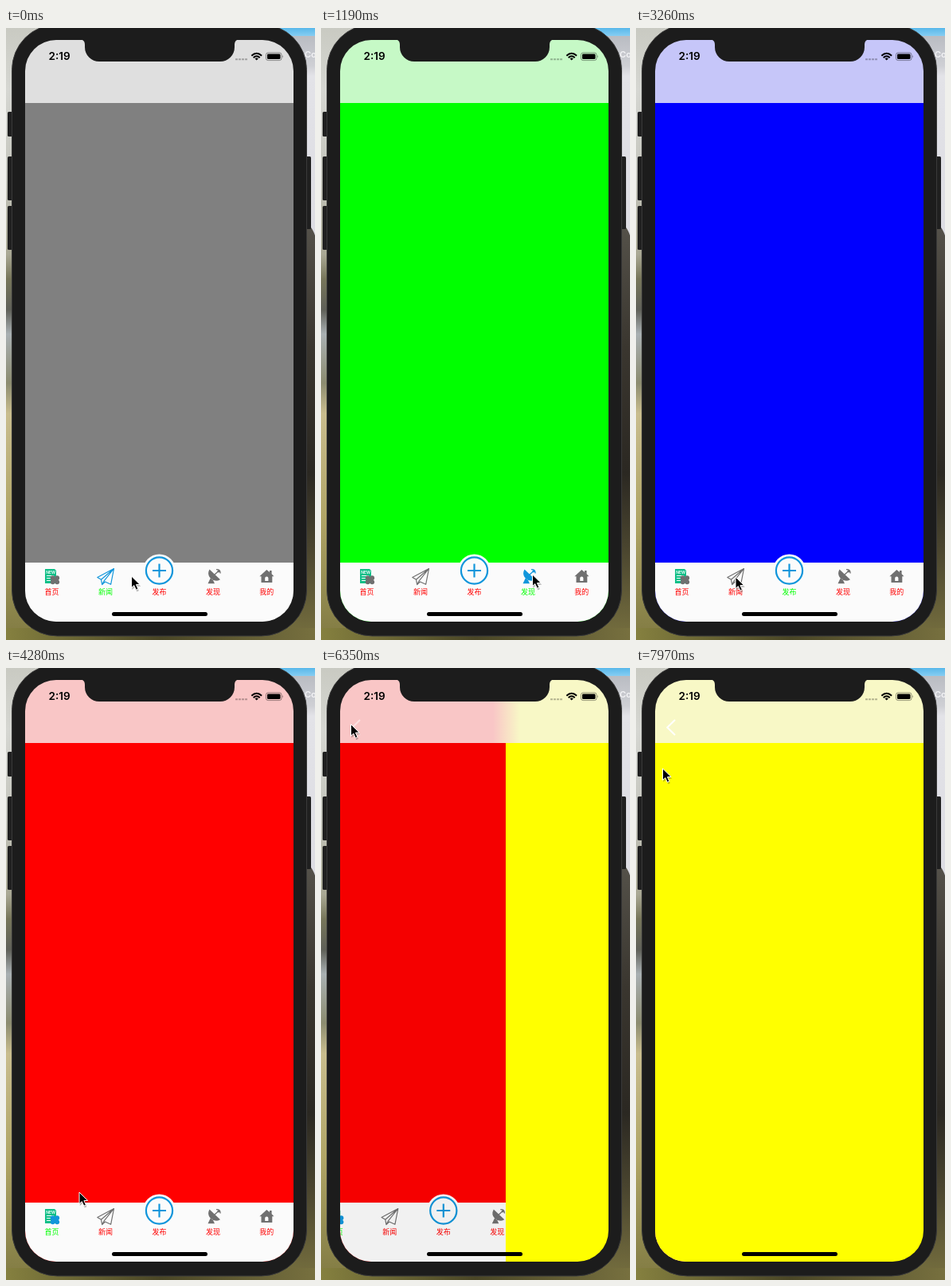
Write an HTML page that moves like this. It is 388 px wide and 767 px high and loops after 8000 ms.

```html
<!DOCTYPE html>
<html lang="zh">
<head>
<meta charset="utf-8">
<title>Tab bar demo</title>
<style>
html, body { margin: 0; width: 100%; height: 100%; overflow: hidden; }
svg { display: block; width: 388px; height: 767px; }
.label { font: 9px "Noto Sans CJK SC", "Noto Sans CJK", sans-serif; text-anchor: middle; fill: #f00; }
.tab { color: #707070; }
.tab.on { color: #1296db; }
.tab.on .label { fill: #0f0; }
</style>
</head>
<body>
<svg viewBox="0 0 388 767">
  <defs>
    <linearGradient id="left" x2="0" y2="1">
      <stop offset="0" stop-color="#c9cac2"/>
      <stop offset=".1" stop-color="#d6d7d2"/>
      <stop offset=".25" stop-color="#c3c4bb"/>
      <stop offset=".37" stop-color="#a9a894"/>
      <stop offset=".41" stop-color="#77765a"/>
      <stop offset=".46" stop-color="#5f6058"/>
      <stop offset=".5" stop-color="#a9b0b2"/>
      <stop offset=".58" stop-color="#8c8c70"/>
      <stop offset=".63" stop-color="#c9bd8e"/>
      <stop offset=".8" stop-color="#b0a566"/>
      <stop offset="1" stop-color="#807a42"/>
    </linearGradient>
    <linearGradient id="bar" x2="0" y2="1">
      <stop offset="0" stop-color="#58b8ea"/>
      <stop offset="1" stop-color="#86cdf2"/>
    </linearGradient>
    <linearGradient id="panel" x2="0" y2="1">
      <stop offset="0" stop-color="#b9bcc2"/>
      <stop offset=".15" stop-color="#cfd0d5"/>
      <stop offset=".2" stop-color="#e3e3e8"/>
      <stop offset="1" stop-color="#dcdce2"/>
    </linearGradient>
    <linearGradient id="hide" x2="0" y2="1">
      <stop offset="0" stop-color="#55524a"/>
      <stop offset=".3" stop-color="#3a362f"/>
      <stop offset=".6" stop-color="#2b2822"/>
      <stop offset=".78" stop-color="#4a452f"/>
      <stop offset="1" stop-color="#77703f"/>
    </linearGradient>
    <linearGradient id="grass">
      <stop offset="0" stop-color="#85803f"/>
      <stop offset=".5" stop-color="#4a4626"/>
      <stop offset="1" stop-color="#77703f"/>
    </linearGradient>
    <linearGradient id="nav" gradientUnits="userSpaceOnUse" y2="0">
      <stop id="navA" offset="0"/>
      <stop offset="1" stop-color="#f8f8c6"/>
    </linearGradient>
    <clipPath id="screen"><rect x="24" y="15" width="337" height="729" rx="39"/></clipPath>
  </defs>

  <rect width="200" height="767" fill="url(#left)"/>
  <rect x="194" width="194" height="10" fill="url(#bar)"/>
  <rect x="194" y="10" width="194" height="250" fill="url(#panel)"/>
  <path d="M194 244H376Q384 248 388 260V767H194Z" fill="url(#hide)"/>
  <rect y="752" width="388" height="15" fill="url(#grass)"/>
  <text x="375" y="37" font-family="Inter, sans-serif" font-size="11" font-weight="600" fill="#f4f4f6">Co</text>

  <g fill="#202020">
    <rect x="2" y="105" width="8" height="31" rx="1.5"/>
    <rect x="2" y="161" width="8" height="55" rx="1.5"/>
    <rect x="2" y="223" width="8" height="55" rx="1.5"/>
    <rect x="375" y="161" width="8" height="91" rx="1.5"/>
  </g>
  <rect x="7.5" y="-4.5" width="370" height="766.5" rx="57" fill="#1c1c1c" stroke="#3a3a3a"/>

  <g clip-path="url(#screen)">
    <g id="page">
      <rect id="body" x="24" y="94" width="337" height="650"/>
      <rect x="24" y="670" width="337" height="74" fill="#fbfbfb"/>
      <circle cx="192.5" cy="680" r="20.5" fill="#fbfbfb"/>

      <g class="tab">
        <path d="M49 678H61L63 680V696H49Z" fill="#10bf88"/>
        <text x="50.2" y="683.8" font-family="Inter, sans-serif" font-size="5" font-weight="600" fill="#fff">NEW</text>
        <path d="M51 686.5h9M51 689.5h5M51 692.5h5" stroke="#fff"/>
        <g fill="currentColor">
          <circle cx="58.7" cy="689.2" r="2.9"/><circle cx="64.2" cy="689.2" r="2.9"/>
          <circle cx="58.7" cy="694.3" r="2.9"/><circle cx="64.2" cy="694.3" r="2.9"/>
          <rect x="59.5" y="690" width="4" height="4"/>
        </g>
        <text class="label" x="57.5" y="710.3">首页</text>
      </g>
      <g class="tab">
        <path d="M135.5 677.5L114.8 688.5L119.5 691.3L120.7 697.7L124.4 694L131.6 697.3ZL119.5 691.3M135.5 677.5L123 693.2L120.7 697.7" fill="none" stroke="currentColor" stroke-width="1.2" stroke-linejoin="round"/>
        <text class="label" x="125" y="710.3">新闻</text>
      </g>
      <g class="tab">
        <circle cx="192.5" cy="680" r="16.6" fill="none" stroke="#1296db" stroke-width="2.2"/>
        <path d="M184 680h17M192.5 671.5v17" stroke="#1296db" stroke-width="2.2"/>
        <text class="label" x="192.5" y="710.3">发布</text>
      </g>
      <g class="tab">
        <path d="M255.5 678.5L269 691.3Q263 695 257 690Q252 685 255.5 678.5ZM256.5 690L253.5 696.3H262L259.5 691Z" fill="currentColor"/>
        <path d="M262 685L267.5 680M264 678.6Q269 678 269.2 683.5" fill="none" stroke="currentColor" stroke-width="1.3"/>
        <circle cx="267" cy="680.8" r="1.6" fill="currentColor"/>
        <text class="label" x="260" y="710.3">发现</text>
      </g>
      <g class="tab">
        <path d="M327.3 679L331 682V680H333.6V684.3L336.5 687.2H334.3V695H320.5V687.2H318.3Z" fill="currentColor"/>
        <path d="M325.2 693V689.5a2.1 2.1 0 0 1 4.2 0V693Z" fill="#fbfbfb"/>
        <text class="label" x="327.3" y="710.3">我的</text>
      </g>
    </g>
    <rect id="dim" x="24" y="94" width="337" height="650"/>
    <rect id="sheet" x="24" y="94" width="337" height="650" fill="#ff0"/>

    <rect x="24" y="15" width="337" height="79" fill="url(#nav)"/>
    <path id="back" d="M49 65L39.3 74.5L49 84" fill="none" stroke="#fff" stroke-width="2"/>
    <path d="M93 14Q99 15 99 21V24a18 18 0 0 0 18 18H269a18 18 0 0 0 18-18V21Q287 15 293 14Z" fill="#1c1c1c"/>
    <text x="53.5" y="40.3" font-family="Inter, sans-serif" font-size="13.5" font-weight="600">2:19</text>
    <path d="M288 39.2h15" stroke="#000" stroke-opacity=".28" stroke-width="2" stroke-dasharray="3 1"/>
    <g fill="none" stroke="#000" stroke-width="2">
      <path d="M308.3 34.7Q314.7 28.7 321.1 34.7M310.7 37.2Q314.7 33.4 318.7 37.2"/>
      <path d="M312.6 38.4Q314.7 36.6 316.8 38.4L314.7 40.6Z" fill="#000" stroke="none"/>
    </g>
    <rect x="326.5" y="31" width="19.5" height="9.6" rx="2.6" fill="none" stroke="#000" stroke-opacity=".4"/>
    <rect x="328" y="32.5" width="16.5" height="6.6" rx="1.4"/>
    <path d="M347.3 34q1.6 1.8 0 3.6Z" fill-opacity=".5"/>
    <rect x="133" y="732" width="120" height="5" rx="2.5"/>
  </g>

  <g id="cursor">
    <path d="M0 1V16L3.4 13L6 18.4L8.6 17.2L6.2 12L11 11.7Z" fill-opacity=".25" transform="translate(.8 1)"/>
    <path d="M0 0V14.6L3.3 11.6L5.8 17.2L8.4 16L5.9 10.6L10.6 10.4Z" stroke="#fff" stroke-linejoin="round"/>
  </g>
</svg>

<script>
const LOOP = 8000, TICK = 147.4, LEFT = 24, WIDTH = 337;
const $ = id => document.getElementById(id);
const tabs = document.querySelectorAll('.tab');

// Page and navigation bar colours, in tab order
const pages = [
  ['#f00', '#f9c6c6'], ['#808080', '#dfdfdf'], ['#00f', '#c6c6f9'],
  ['#0f0', '#c6f9c6'], ['#ff8000', '#f9dfc6']
];
// [tick, tab]
const taps = [[0, 1], [3, 2], [8, 3], [12, 4], [15, 3], [19, 2], [23, 1], [27, 0]];
// [tick, opening]
const slides = [[35, true], [43, false], [50, true]];
// [tick, x, y]
const path = [
  [0, 157.5, 687], [1, 184, 688], [3, 184, 688], [6, 265.5, 685], [8, 265.5, 685],
  [11, 327, 688], [12, 327, 688], [14, 257.5, 687], [15, 257.5, 687],
  [18, 190, 687], [19, 190, 687], [22, 125, 688], [23, 125, 688],
  [26, 58, 689], [27, 58, 689], [29, 92, 657], [33, 126, 342.5], [36, 126, 342.5],
  [38, 12, 50], [39, 26, 73], [41, 37.5, 70.5], [44, 37.5, 70.5],
  [47, 110, 240], [50, 110, 240], [54, 33.5, 126]
];

const latest = (list, tick) => list.filter(row => row[0] <= tick).pop();

function cursorAt(tick) {
  const a = latest(path, tick);
  const b = path[path.indexOf(a) + 1] || a;
  const u = a === b ? 0 : (tick - a[0]) / (b[0] - a[0]);
  const e = u * u * (3 - 2 * u);
  return [a[1] + (b[1] - a[1]) * e, a[2] + (b[2] - a[2]) * e];
}

// Share of the screen covered by the pushed page
function coverAt(tick) {
  const slide = latest(slides, tick);
  if (!slide) return 0;
  const [start, opening] = slide, n = tick - start;
  const rest = n > 3 ? 0 : (opening ? .493 : .383) * .09 ** n;
  return opening ? 1 - rest : rest;
}

function draw(tick) {
  const tab = latest(taps, tick)[1];
  const cover = coverAt(tick);
  const shift = WIDTH * (1 - cover);
  const edge = LEFT + shift;
  const [fill, tint] = pages[tab];
  const soft = cover > .99 ? -60 : cover < .01 ? 60 : 0;

  tabs.forEach((el, i) => el.classList.toggle('on', i === tab));
  $('body').setAttribute('fill', fill);
  $('page').setAttribute('transform', `translate(${-.3 * WIDTH * cover})`);
  $('dim').setAttribute('opacity', .1 * cover);
  $('sheet').setAttribute('transform', `translate(${shift})`);
  $('navA').setAttribute('stop-color', tint);
  $('nav').setAttribute('x1', edge - 16 + soft);
  $('nav').setAttribute('x2', edge + 18 + soft);
  $('back').setAttribute('opacity', Math.min(1, cover * 1.2));
  $('cursor').setAttribute('transform', `translate(${cursorAt(tick)})`);
}

const begin = performance.now();
function frame() {
  draw(Math.floor((performance.now() - begin) % LOOP / TICK));
  requestAnimationFrame(frame);
}
frame();
</script>
</body>
</html>
```
